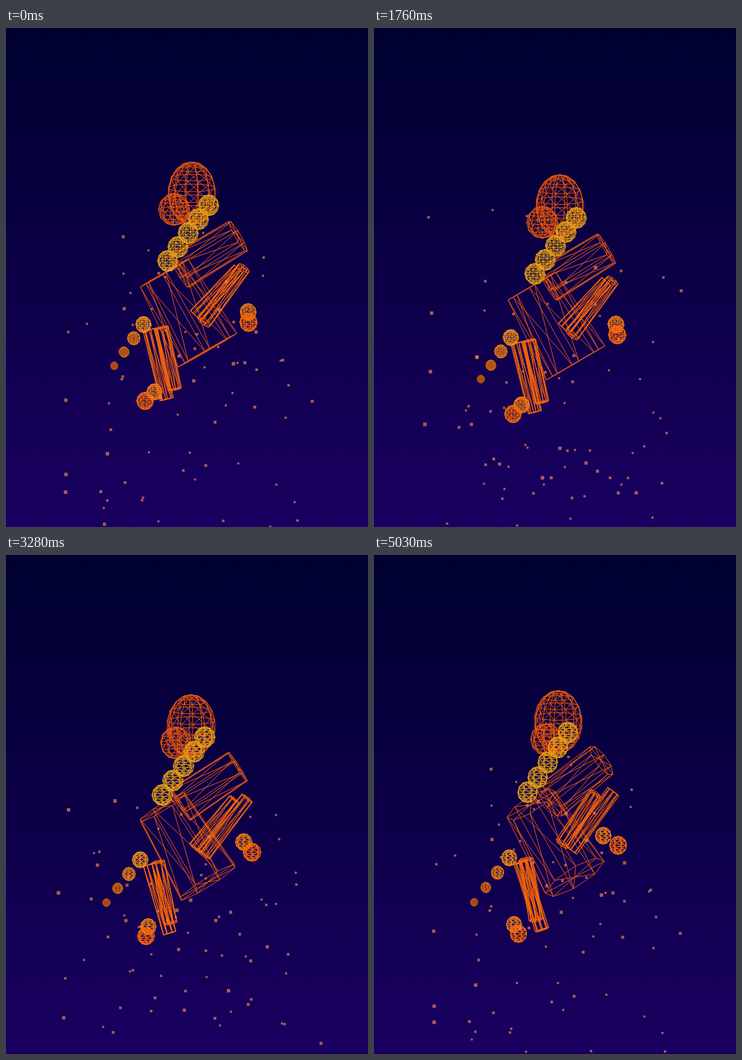
Animation of 523 by 720 pixels, one loop 5.11 s. Source, as an HTML page with a canvas:

```html
<!DOCTYPE html>
<html lang="en">
<head>
<meta charset="utf-8">
<title>Wireframe figure</title>
<style>
  html, body { margin: 0; width: 100%; height: 100%; overflow: hidden; background: #000030; }
  canvas { display: block; width: 523px; height: 720px; }
</style>
</head>
<body>
<canvas id="stage" width="523" height="720"></canvas>
<script>
const WIDTH = 523, HEIGHT = 720, LOOP = 5110, TAU = Math.PI * 2;
const AXIS_X = 265, PITCH = .16;
const ctx = document.getElementById('stage').getContext('2d');

let yaw = 0, crown = 0;

// The figure floats up and down while it turns slowly about its vertical axis
function pose(t) {
  crown = 202.2 + 10 * Math.cos(TAU * (t - 2050) / 4700);
  yaw = .324 * (1 - Math.cos(Math.PI * (t - 700) / 5000)) - .02;
}

function project([x, y, z]) {
  const c = Math.cos(yaw), s = Math.sin(yaw);
  return [AXIS_X + x * c + z * s, crown + y + PITCH * (z * c - x * s)];
}

const mix = (a, b, u) => a.map((v, i) => v + (b[i] - v) * u);
const scale = (a, k) => a.map(v => v * k);
const add = (...vectors) => vectors.reduce((a, b) => a.map((v, i) => v + b[i]));
const unit = a => scale(a, 1 / Math.hypot(...a));
const cross = (a, b) => [
  a[1] * b[2] - a[2] * b[1], a[2] * b[0] - a[0] * b[2], a[0] * b[1] - a[1] * b[0]
];

function wire(color, build) {
  ctx.strokeStyle = color;
  ctx.beginPath();
  build((...points) => points.forEach((p, i) => {
    const [x, y] = project(p);
    if (i) ctx.lineTo(x, y); else ctx.moveTo(x, y);
  }));
  ctx.stroke();
}

function ball(center, radius, color, { cols = 8, rows = 6, stretch = 1 } = {}) {
  const at = (i, j) => {
    const lat = Math.PI * j / rows, lon = TAU * i / cols + .25;
    const r = radius * Math.sin(lat);
    return add(center, [r * Math.cos(lon), -radius * stretch * Math.cos(lat), r * Math.sin(lon)]);
  };
  wire(color, line => {
    for (let i = 0; i < cols; i++)
      for (let j = 0; j < rows; j++) {
        line(at(i + 1, j), at(i, j), at(i, j + 1));
        if (j && j < rows - 1) line(at(i + 1, j), at(i, j + 1));
      }
  });
}

function tube(a, b, ra, rb, color, sides = 8) {
  const axis = add(b, scale(a, -1));
  const u = unit(cross(axis, [0, 0, 1])), v = unit(cross(axis, u));
  const rim = (center, r, i) => {
    const angle = TAU * i / sides + .15;
    return add(center, scale(u, r * Math.cos(angle)), scale(v, r * Math.sin(angle)));
  };
  wire(color, line => {
    for (let i = 0; i < sides; i++) {
      line(a, rim(a, ra, i), rim(a, ra, i + 1), rim(b, rb, i), rim(b, rb, i + 1));
      line(rim(a, ra, i), rim(b, rb, i), b);
    }
  });
}

function chain(from, to, count, r0, r1, color) {
  for (let i = 0; i < count; i++) {
    const u = i / (count - 1);
    ball(mix(from, to, u), r0 + (r1 - r0) * u, color(u));
  }
}

function drawFigure() {
  const dim = '#e6560f', orange = '#ee5a14', bright = '#fb6808', amber = '#f07c11';
  ctx.lineWidth = .95;

  tube([-36, 163, -15], [26, 271, 6], 40, 49, dim);
  tube([70, 106, 10], [-14, 158, 1], 26, 28, orange);

  tube([78, 149, 29], [21, 231, 3], 10, 11, bright);
  tube([71, 156, -8], [9, 222, 0], 9, 11, bright);
  tube([-57, 244, -11], [-33, 341, 9], 10, 10, bright);
  tube([-40, 243, -23], [-21, 332, -24], 10, 10, bright);

  ball([3.5, 46, -3], 35, dim, { cols: 12, rows: 9, stretch: 1.29 });
  ball([-22, 68, 4], 23, dim, { cols: 9 });

  chain([28, 65, -14], [-31, 148, -31], 5, 15, 15, () => '#e6a017');
  chain([-66, 239, -27], [-108, 303, -55], 4, 11.5, 5.5, u => `hsl(${33 - 10 * u},85%,${51 - 12 * u}%)`);

  ball([-50, 338, -38], 11.5, amber);
  ball([-64, 346, -6], 12.5, bright);
  ball([85, 218, -7], 12, amber);
  ball([85, 227, 31], 13, bright);
}

function random(seed) {
  return () => {
    seed = seed + 0x6D2B79F5 | 0;
    let n = Math.imul(seed ^ seed >>> 15, 1 | seed);
    n = n + Math.imul(n ^ n >>> 7, 61 | n) ^ n;
    return ((n ^ n >>> 14) >>> 0) / 4294967296;
  };
}

const rand = random(41);
const embers = Array.from({ length: 75 }, () => {
  const near = rand();
  return {
    x: 268 + (rand() * 2 - 1) * (130 + 120 * near) - near * 15,
    rise: 260 + 240 * rand(),
    phase: rand(),
    drift: (rand() - .5) * 50,
    size: 3 + 2.2 * near * near
  };
});

function drawEmbers(t) {
  ctx.fillStyle = 'rgba(250,140,84,.65)';
  for (const e of embers) {
    const life = (e.phase + t / LOOP) % 1;
    const x = e.x + e.drift * life + 5 * Math.sin(TAU * (life + e.phase));
    ctx.fillRect(x - e.size / 2, 730 - e.rise * life, e.size, e.size);
  }
}

const sky = ctx.createLinearGradient(0, 0, 0, HEIGHT);
sky.addColorStop(0, '#000030');
sky.addColorStop(.15, '#020035');
sky.addColorStop(1, '#1a0061');

function draw() {
  const t = performance.now() % LOOP;
  pose(t);
  ctx.fillStyle = sky;
  ctx.fillRect(0, 0, WIDTH, HEIGHT);
  drawFigure();
  drawEmbers(t);
  requestAnimationFrame(draw);
}
draw();
</script>
</body>
</html>
```
